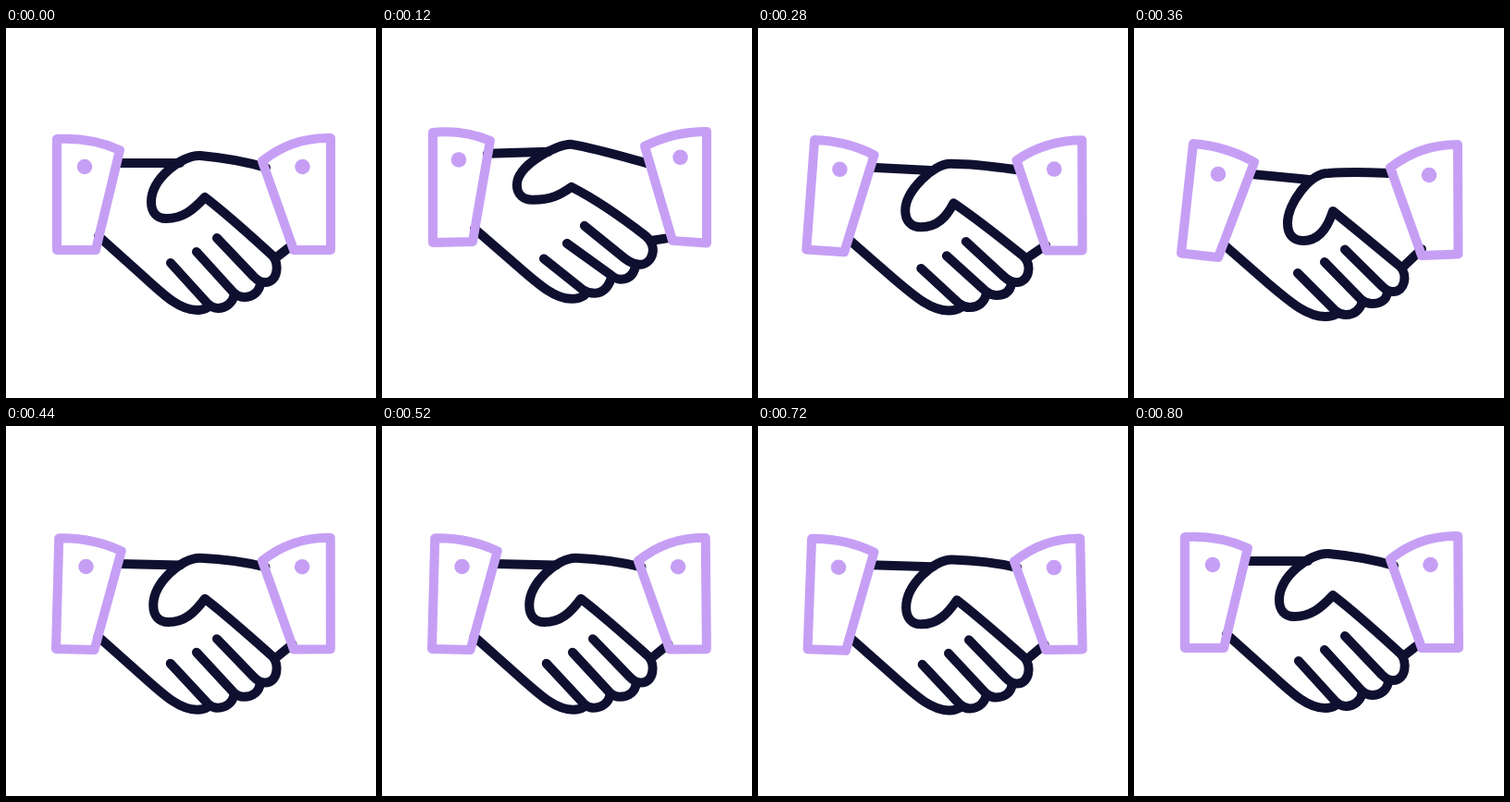
An HTML page for the animation above (880 ms loop, 400 by 400 pixels).

```html
<!DOCTYPE html>
<html lang="en">
<head>
<meta charset="utf-8">
<title>Handshake</title>
<style>
  html, body { margin: 0; width: 100%; height: 100%; overflow: hidden; background: #fff; }
  svg { display: block; width: 100%; height: 100%; fill: none; stroke-width: 10; stroke-linecap: round; stroke-linejoin: round; }
</style>
</head>
<body>
<svg id="stage" viewBox="0 0 400 400"></svg>
<script>
const DARK = '#0f1030', LILAC = '#c69ff5';
const LOOP = 880, STEP = 40, LAST_STEP = 800;

// Each part is drawn in three poses: rest, raised, lowered.
const parts = [
  // far edge of the left hand
  { color: DARK, poses: ['M120 146L188 146', 'M114 136L180 134', 'M127 158L190 164'] },
  // right wrist
  { color: DARK, poses: ['M309 235L291 249', 'M311 227L292 230', 'M311 239L291 258'] },
  // thumb and index finger
  { color: DARK, poses: [
    'M281 151C258 144 232 140 210 138C190 137 157 163 157 188C157 199 163 206 173 206C191 206 202 197 215 183Q240 202 288 246C296 255 294 275 280 275Q274 275 268 269L228 227',
    'M289 147C260 139 230 130 205 126C190 125 146 148 146 170C146 180 153 186 163 186C183 186 192 181 205 172Q240 190 285 225C300 238 291 256 279 256Q271 256 262 249L219 214',
    'M279 157C262 156.5 238 155 210 157C190 157 166 190 166 211C166 223 172 230 183 230C199 230 209 217 215 198Q240 218 288 258C296 267 293 285 280 285Q274 285 268 279L228 239.5'] },
  // middle finger
  { color: DARK, poses: [
    'M275 276C274 285 267 291 257 291Q251 291 246 286L206 242',
    'M274 258C272 267 267 272 258 272Q253 272 247 267L200 233',
    'M274 286C273 294 267 298 257 298Q251 298 246 294L206 253'] },
  // ring finger
  { color: DARK, poses: [
    'M247 288C245 297 238 303 229 303Q223 303 218 298L178 254',
    'M248 270C245 280 239 287 230 287Q223 287 217 283L175 249.5',
    'M247 296C244 305 238 310 229 310Q223 310 218 306L177 265'] },
  // lower edge of the hands
  { color: DARK, poses: [
    'M100 225L148 268C172 290 188 305 207 305Q213 305 218 302',
    'M100 217L146 257C172 280 188 293 205 293Q213 293 219 289',
    'M98 235L146 277C172 299 188 312 207 312Q214 312 219 309'] },
  // left cuff and button
  { color: LILAC, poses: [
    'M55 120Q92 118 123 132L97 240L55 240Z',
    'M55 113Q88 110 117 122L98 231L55 232Z',
    'M64 125Q100 128 130 145L91 248L51 243.5Z'] },
  { color: LILAC, width: 16.5, poses: ['M85 150L85 150', 'M83 142.5L83 142.5', 'M91 158L91 158'] },
  // right cuff and button
  { color: LILAC, lean: -4, poses: [
    'M351 119Q309 118 277 144L311 240L351 240Z',
    'M351 112Q315 112 284 128L314 230L351 232.5Z',
    'M350 126Q309 126 277 151L311 246L350.5 244.5Z'] },
  { color: LILAC, width: 16.5, poses: ['M320.5 150L320.5 150', 'M322.5 140L322.5 140', 'M319 159L319 159'] }
];

// Keyframes: [time, weight]
const raise = [[0, 0], [150, 1.12], [360, 0], [880, 0]];
const lower = [[0, 0], [150, 0], [360, 1], [480, 0], [600, 1], [800, 0], [880, 0]];
const leaning = [[0, 0], [480, 0], [600, 1], [880, 0]];

function track(keys, t) {
  const i = keys.findIndex(key => key[0] > t);
  const [t0, a] = keys[i - 1], [t1, b] = keys[i];
  return a + (b - a) * (1 - Math.cos(Math.PI * (t - t0) / (t1 - t0))) / 2;
}

const NUMBER = /[\d.]+/g;
for (const part of parts) {
  part.points = part.poses.map(d => d.match(NUMBER).map(Number));
  part.node = document.createElementNS('http://www.w3.org/2000/svg', 'path');
  part.node.setAttribute('stroke', part.color);
  if (part.width) part.node.setAttribute('stroke-width', part.width);
  stage.append(part.node);
}

function draw(t) {
  const up = track(raise, t), down = track(lower, t), lean = track(leaning, t);
  for (const { node, poses, points: [rest, high, low], lean: shift = 0 } of parts) {
    let i = 0;
    node.setAttribute('d', poses[0].replace(NUMBER, () => {
      const base = rest[i];
      let v = base + up * (high[i] - base) + down * (low[i] - base);
      if (i === 0) v += shift * lean;
      i++;
      return v.toFixed(2);
    }));
  }
}

function tick() {
  const t = performance.now() % LOOP;
  draw(Math.min(Math.floor(t / STEP) * STEP, LAST_STEP));
  requestAnimationFrame(tick);
}
tick();
</script>
</body>
</html>
```
